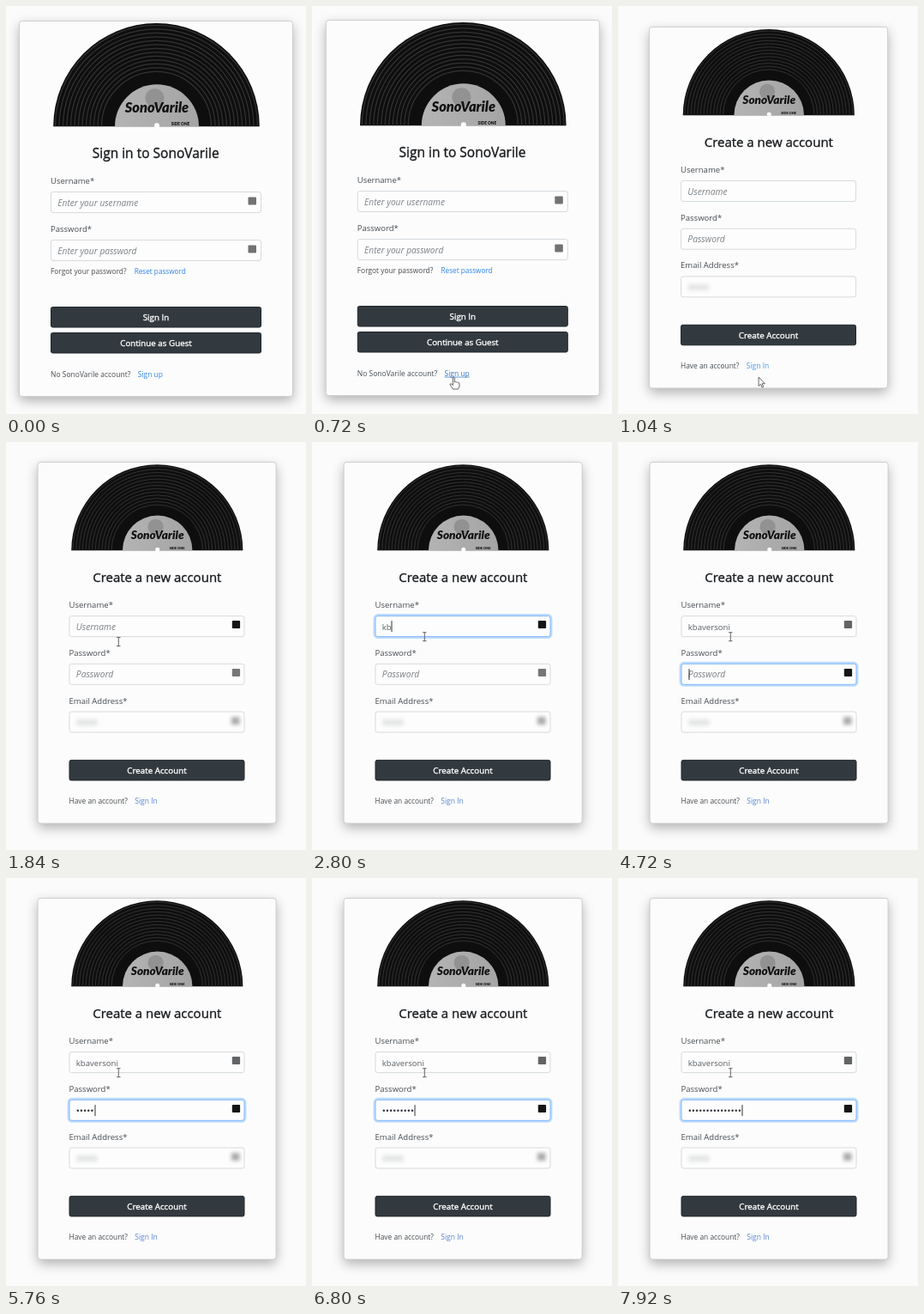
Write an HTML page with a canvas that moves like this. It is 350 px wide and 475 px high and loops after 8 s.

```html
<!DOCTYPE html>
<html lang="en">
<head>
<meta charset="utf-8">
<title>Sign in</title>
<style>
html, body { margin: 0; width: 100%; height: 100%; overflow: hidden; background: #fbfbfb; }
canvas { display: block; }
</style>
</head>
<body>
<canvas id="stage" width="350" height="475"></canvas>
<script>
const c = document.getElementById('stage').getContext('2d');
const LOOP = 8000, USER = 'kbaversoni', BRAND = 'SonoVarile';
const SANS = '"Open Sans", "Noto Sans", sans-serif';
const INK = '#181b1e', LABEL = '#484d52', HINT = '#7d8287', LINK = '#2f86ea';
const OPEN_FORM = 960, FOCUS_USER = 2160, TYPE_USER = 2500, FOCUS_PASS = 4640, TYPE_PASS = 4900;

function text(s, x, y, size, color, style = '', align = 'left') {
  c.font = `${style} ${size}px ${SANS}`;
  c.fillStyle = color;
  c.textAlign = align;
  c.fillText(s, x, y);
  return c.measureText(s).width;
}

// Centred text with a hairline outline, between regular and semibold
function heavyText(s, x, y, size, color) {
  text(s, x, y, size, color, '', 'center');
  c.strokeStyle = color;
  c.lineWidth = .35;
  c.strokeText(s, x, y);
}

function box(x, y, w, h, r, fill, stroke, line = 1) {
  c.beginPath();
  c.roundRect(x, y, w, h, r);
  if (fill) { c.fillStyle = fill; c.fill(); }
  if (stroke) { c.strokeStyle = stroke; c.lineWidth = line; c.stroke(); }
}

function disc(x, y, r, fill) {
  c.beginPath();
  c.arc(x, y, r, 0, 7);
  c.fillStyle = fill;
  c.fill();
}

function card(x, y, w, h) {
  c.save();
  c.shadowColor = 'rgba(0,0,0,.3)';
  c.shadowBlur = 14;
  c.shadowOffsetY = 5;
  box(x, y, w, h, 3, '#fcfcfc');
  c.restore();
  box(x, y, w, h, 3, null, '#cccecf');
}

function record(x, y, scale) {
  c.save();
  c.translate(x, y);
  c.scale(scale, scale);
  c.beginPath();
  c.rect(-125, -125, 250, 125);
  c.clip();
  disc(0, 0, 120.3, '#0e0e0e');
  c.lineWidth = 1.2;
  c.strokeStyle = '#333';
  for (let r = 64; r < 119; r += 4.5) {
    c.beginPath();
    c.arc(0, 0, r, 0, 7);
    c.stroke();
  }
  const paper = c.createLinearGradient(-50, 0, 50, 0);
  paper.addColorStop(0, '#b4b4b4');
  paper.addColorStop(1, '#a4a4a4');
  disc(.5, 0, 49, paper);
  disc(-2, -33, 11, '#929292');
  c.font = 'italic 900 16.4px Lato, sans-serif';
  c.fillStyle = '#111';
  c.textAlign = 'center';
  c.fillText(BRAND, .5, -16);
  c.font = '900 4.7px Lato, sans-serif';
  c.fillText('SIDE ONE', 28, -1.5);
  c.restore();
  c.save();
  c.beginPath();
  c.rect(x - 9, y - 9, 18, 9.6);
  c.clip();
  disc(x + .5, y - 1, 3 * scale, '#fff');
  c.restore();
}

function field(x, y, w, focused) {
  if (focused) box(x - .5, y - .5, w + 1, 25, 3.5, null, '#bfdcfd', 4);
  box(x, y, w, 24, 2.5, '#fdfdfd', focused ? '#80b8fa' : '#d6dadd');
}

function button(s, x, y, w) {
  box(x + .5, y + .5, w - 1, 23.5, 2, '#333a3f', '#1e2529');
  heavyText(s, x + w / 2, y + 15.9, 9.8, '#fff');
}

function caret(x, y) {
  c.fillStyle = '#333';
  c.fillRect(Math.round(x), y, 1, 13);
}

function smudge(x, y, w, h, color) {
  c.save();
  c.filter = 'blur(2px)';
  c.fillStyle = color;
  c.fillRect(x, y, w, h);
  c.restore();
}

function signIn(t) {
  const X = 52, W = 246, hover = t >= 600;
  c.save();
  if (t >= 80) c.translate(.8, -1);
  card(15.5, 17.5, 319, 437);
  record(175.5, 140.3, 1);
  heavyText('Sign in to ' + BRAND, 174.7, 177, 15.5, INK);
  [['Username', 216.5], ['Password', 272.5]].forEach(([name, y]) => {
    text(name + '*', X, y - 9.5, 9.5, LABEL);
    field(X + .5, y, W - 1);
    text('Enter your ' + name.toLowerCase(), 60.3, y + 16.3, 10.2, HINT, 'italic');
    box(282.5, y + 6, 9.5, 9, 1, '#707274');
  });
  text('Forgot your password?', X, 311.5, 8.35, LABEL);
  text('Reset password', 149.7, 311.5, 8.2, LINK);
  button('Sign In', X, 350, W);
  button('Continue as Guest', X, 380, W);
  text(`No ${BRAND} account?`, X, 431.5, 8.5, LABEL);
  const w = text('Sign up', 153.7, 431.5, 8.5, hover ? '#3878c4' : LINK);
  if (hover) {
    c.fillStyle = '#3878c4';
    c.fillRect(153.7, 432.7, w, .7);
  }
  c.restore();
}

function createAccount(t) {
  const X = 73, W = 205, settled = t >= 1120, icons = t >= 1200;
  const onUser = t >= FOCUS_USER && t < FOCUS_PASS, onPass = t >= FOCUS_PASS;
  const count = (start, step) => t < start ? 0 : Math.floor((t - start) / step) + 1;
  c.save();
  if (settled) c.translate(.5, -.9);
  card(36.6, 24.4, 278, 420.5);
  record(175.8, 127.2, .832);
  heavyText('Create a new account', 175.8, 164.3, 15, INK);

  const rows = [['Username', 203.5, onUser], ['Password', 259.2, onPass], ['Email Address', 314.9, false]];
  rows.forEach(([name, y, focused]) => {
    text(name + '*', X, y - 9.5, 9.55, LABEL);
    field(X + .5, y, W - 1, focused);
  });

  const typed = USER.slice(0, count(TYPE_USER, 180));
  const w = typed ? text(typed, 81.3, 219.5, 9.6, '#585e64') : 0;
  if (!typed) text('Username', 81.3, 219.5, 10.3, HINT, 'italic');
  if (onUser) caret(81.5 + w, 209);

  const dots = count(TYPE_PASS, 215);
  for (let i = 0; i < dots; i++) disc(83.3 + i * 4.15, 271.7, 1.25, '#30343a');
  if (!dots) text('Password', 81.3, 275.3, 10.3, HINT, 'italic');
  if (onPass) caret(81.8 + dots * 4.15, 265);

  smudge(82, 324, 24, 7, '#e3e4e5');
  if (icons) {
    box(263.3, 209, 9.3, 9, 1, onPass ? '#626466' : '#141414');
    box(263.3, 264.8, 9.3, 9, 1, onPass ? '#141414' : '#757779');
    smudge(262.5, 321, 9.5, 9, '#a9aaab');
  }
  button('Create Account', X, 370.8, W);
  text('Have an account?', X, 422.3, 8.4, LABEL);
  text('Sign In', 149.8, 422.3, 8.5, settled ? '#5585d6' : '#4a9af0');
  c.restore();
}

const SHAPES = {
  arrow: 'M0 0V10.5L2.4 8.3 4 12 5.6 11.3 4 7.7H7.2Z',
  hand: 'M-1 1Q0-1 1 1V6Q2 5 3 6 4 5.4 5 6.5 6.5 6 6.6 8V11L5 14H-1L-4.3 9Q-4.3 7-2.5 8L-1 9.5Z'
};

function pointer(kind, x, y) {
  c.save();
  c.translate(x, y);
  c.strokeStyle = '#555';
  c.lineWidth = .9;
  c.lineJoin = 'round';
  if (kind === 'beam') {
    c.stroke(new Path2D('M-2.2-5H2.2M0-5V5M-2.2 5H2.2'));
  } else {
    const p = new Path2D(SHAPES[kind]);
    c.fillStyle = '#fff';
    c.fill(p);
    c.stroke(p);
  }
  c.restore();
}

// Pointer stops: time, x, y
const PATH = [[120, -8, 310], [640, 165.5, 432], [1120, 164, 432], [1680, 131.3, 232.5],
  [1920, 131.3, 232.5], [2080, 131.3, 226.7], [LOOP, 131.3, 226.7]];

function pointerAt(t) {
  const i = Math.max(1, PATH.findIndex(p => p[0] > t));
  const [t0, x0, y0] = PATH[i - 1], [t1, x1, y1] = PATH[i];
  const k = Math.min(1, Math.max(0, (t - t0) / (t1 - t0)));
  const e = k * k * (3 - 2 * k);
  return [x0 + (x1 - x0) * e, y0 + (y1 - y0) * e];
}

function draw(t) {
  c.fillStyle = '#fbfbfb';
  c.fillRect(0, 0, 350, 475);
  const [x, y] = pointerAt(t);
  if (t < OPEN_FORM) {
    signIn(t);
    pointer(t >= 600 ? 'hand' : 'arrow', x, y);
  } else {
    createAccount(t);
    pointer(y < 345 ? 'beam' : 'arrow', x, y);
  }
}

const begin = performance.now();
function frame() {
  draw((performance.now() - begin) % LOOP);
  requestAnimationFrame(frame);
}
frame();
</script>
</body>
</html>
```
